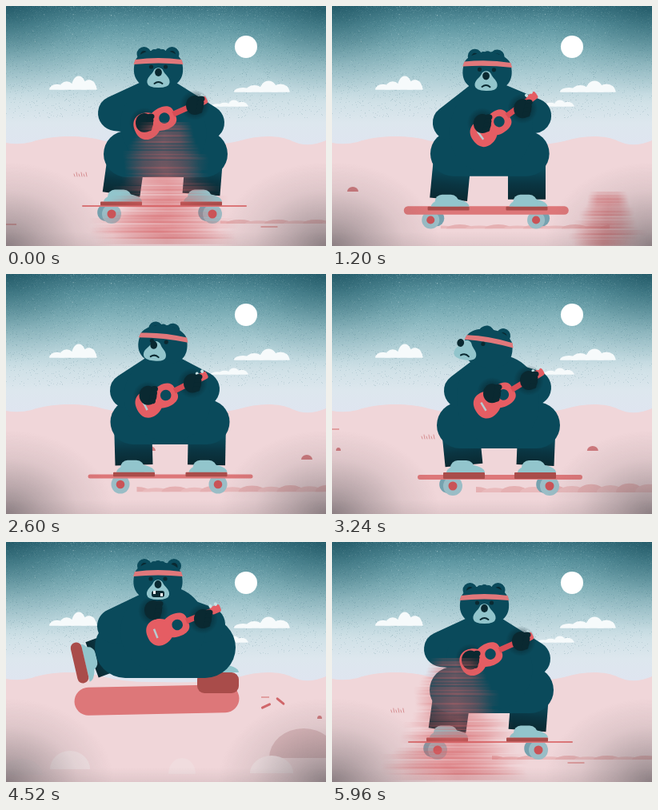
Animation, 400 px wide and 300 px high, one loop 6000 ms. Source, as an HTML page with a canvas:

```html
<!DOCTYPE html>
<html lang="en">
<head>
<meta charset="utf-8">
<title>Skating bear</title>
<style>
html, body { margin: 0; width: 100%; height: 100%; overflow: hidden; background: #f0d6d9; }
canvas { display: block; width: 400px; height: 300px; }
</style>
</head>
<body>
<canvas id="stage" width="400" height="300"></canvas>
<script>
const LOOP = 6000, STEP = 40, TAU = Math.PI * 2, DEG = Math.PI / 180;
const FUR = '#0a4a5b', DARK = '#0a2931', PALE = '#92c5cc', RED = '#e55d63',
      BAND = '#e0787b', BOARD = '#dd7779', SOLE = '#a94c4a';
let g = document.getElementById('stage').getContext('2d');

// head: x, y, tilt, turn, dip, mouth; arms: both elbows; knees: both, radius
// feet: x, y, angle, sole height (twice); board: x, y, thickness, tilt
// wheels: x1, x2, y, radius, far wheel offset
const front = {
  t: 0, head: [190.5, 79, 0, 0, 0, 0], ears: [-18, 17], arms: [137, 134, 251, 146],
  knees: [151, 185, 248, 185, 29], feet: [144, 247, 0, 5, 244, 247, 0, 5],
  guitar: [187, 145, -24], hands: [173, 146, 236, 124],
  board: [198, 250, 2, 0], wheels: [132, 258, 260, 12, -7]
};
const poses = [
  front,
  { t: 600, head: [192, 81, 1, -.32, 2, 0], ears: [-15, 17], arms: [152, 146, 262, 131],
    knees: [147, 187, 241, 187, 29], feet: [139, 256, 0, 6, 241, 256, 0, 6],
    guitar: [217, 148, -46], hands: [211, 138, 251, 120],
    board: [187, 258, 15, 0], wheels: [115, 253, 272, 11, 8] },
  { t: 1960, head: [197, 84, 2, .36, 0, 0], ears: [-17, 5], arms: [142, 146, 238, 146],
    knees: [157, 181, 247, 181, 27], feet: [155, 249, 0, 3, 247, 249, 0, 3],
    guitar: [174, 157, -23], hands: [155, 158, 220, 140],
    board: [201, 252, 4, 0], wheels: [135, 258, 261, 11, 6] },
  { t: 3240, head: [195, 93, 10, -1, -5, 0], ears: [-5, 16], arms: [162, 146, 252, 142],
    knees: [160, 189, 256, 189, 29], feet: [165, 252, 0, 8, 254, 252, 0, 8],
    guitar: [204, 157, -31], hands: [200, 148, 246, 133],
    board: [210, 254, 6, 0], wheels: [151, 272, 265, 12, -6] },
  { t: 4520, head: [190, 49, 0, 0, 0, 1], ears: [-17, 20], arms: [136, 105, 252, 103],
    knees: [149, 132, 249, 132, 38], feet: [92, 151, 77, 14, 265, 176, 0, 26],
    guitar: [203, 108, -22], hands: [184, 86, 246, 96],
    board: [188.5, 197.5, 35, -1.2], wheels: [124, 250, 204, 0, 0] },
  { t: 5360, head: [183, 95, -12, .85, 15, 0], ears: [-19, 20], arms: [140, 142, 253, 142],
    knees: [148, 181, 249, 181, 28], feet: [139, 246, 0, 6, 243, 246, 0, 6],
    guitar: [197, 165, -29], hands: [156, 172, 240, 147],
    board: [184, 250, 4, 0], wheels: [125, 247, 263, 11, -10] },
  { ...front, t: 5960 },
  { ...front, t: LOOP }
];

// Scenery slides right; each piece is pinned to a place at one moment.
const props = [
  [grass, 0, 94, 213, .28], [dash, 0, 6, 273, .6, 14], [dash, 0, 329, 276, .6, 21],
  [dash, 600, 80, 219, .3, 14], [mound, 1960, 34, 221, .228, 7, 6, '#cd797d'],
  [mound, 1960, 216, 232, .25, 7, 6, '#cd797d'], [grass, 3240, 121, 206, .25],
  [dash, 3240, 4, 194, .25, 10], [dash, 5360, 323, 194, .22, 9],
  [twig, 4520, 325, 205, .3, -25], [twig, 4520, 343, 199, .3, 40],
  [mound, 4520, 392, 221, .3, 3, 4, '#cd797d'],
  [mound, 4520, 372, 270, .5, 43, 37, '#dcb8bb'], [mound, 4520, 80, 284, .5, 25, 23, '#f3e2e4'],
  [mound, 4520, 220, 290, .5, 17, 20, '#f0dcde'], [mound, 4520, 332, 289, .5, 27, 22, '#f3e2e4'],
  [mound, 4520, 20, 291, .5, 26, 20, '#ecd6d9']
];
// time, x, top, bottom
const smears = [[0, 199, 148, 296], [600, 55, 240, 298], [600, 313, 243, 298], [600, 386, 187, 268],
                [1050, 180, 235, 298], [1560, 210, 245, 298]];
const dustKeys = [
  { t: 0, d: [268, 400, 272, 5, 0] }, { t: 600, d: [128, 310, 283, 5, 0] },
  { t: 1960, d: [147, 400, 272, 6, 0] }, { t: 3240, d: [180, 400, 273, 7, 5] },
  { t: 3800, d: [300, 400, 273, 7, 5] }, { t: 4100, d: [400, 400, 273, 0, 0] },
  { t: 5100, d: [150, 150, 272, 0, 0] }, { t: 5360, d: [150, 318, 272, 7, 0] },
  { t: 5960, d: [200, 400, 272, 5, 0] }, { t: LOOP, d: [268, 400, 272, 5, 0] }
];

function random(seed) {
  return () => (seed = (seed * 16807) % 2147483647) / 2147483647;
}
function blend(keys, t) {
  const i = Math.max(1, keys.findIndex(k => k.t > t)), a = keys[i - 1], b = keys[i];
  const u = (t - a.t) / (b.t - a.t), s = u * u * (3 - 2 * u), out = {};
  for (const k in a) if (k !== 't') out[k] = a[k].map((v, n) => v + (b[k][n] - v) * s);
  return out;
}
function oval(x, y, rx, ry, color, a = 0, b = TAU) {
  g.beginPath();
  g.ellipse(x, y, Math.max(0, rx), Math.max(0, ry), 0, a, b);
  g.fillStyle = color;
  g.fill();
}
function pill(x, y, w, h, r, color) {
  g.beginPath();
  g.roundRect(x, y, w, h, r);
  g.fillStyle = color;
  g.fill();
}
function line(x1, y1, x2, y2, w, color, cap = 'round') {
  g.beginPath();
  g.moveTo(x1, y1);
  g.lineTo(x2, y2);
  g.lineWidth = w;
  g.lineCap = cap;
  g.strokeStyle = color;
  g.stroke();
}
function path(d, color) {
  g.fillStyle = color;
  g.fill(new Path2D(d));
}
function placed(x, y, deg, draw) {
  g.save();
  g.translate(x, y);
  g.rotate(deg * DEG);
  draw();
  g.restore();
}
function ramp(gradient, ...stops) {
  stops.forEach((c, i) => gradient.addColorStop(i / (stops.length - 1), c));
  return gradient;
}

function mound(x, y, rx, ry, color) { oval(x, y, rx, ry, color, Math.PI, TAU); }
function dash(x, y, w) { line(x - w / 2, y, x + w / 2, y, 1.5, '#dc8c8e', 'butt'); }
function twig(x, y, deg) {
  placed(x, y, deg, () => line(-5, 0, 5, 0, 3, '#d0666a'));
}
function grass(x, y) {
  for (let i = 0; i < 6; i++) line(x - 8 + i * 3, y, x - 9 + i * 3, y - 3 - (i * 2) % 4, 1, '#d68f92');
}
function cloud(x, y, w, h) {
  const lumps = [[.15, .4], [.36, .6], [.62, 1], [.84, .72]];
  for (const [p, s] of lumps) mound(x + p * w, y, w * .165, h * s, '#f6fafb');
  line(x, y - .7, x + w, y - .7, 1.5, '#f6fafb');
}

function paintBackdrop() {
  const sky = g.createLinearGradient(0, 0, 0, 172);
  [[0, '#3b7482'], [.14, '#5e97a2'], [.32, '#86b5bd'], [.5, '#abccd3'], [.7, '#d0e1e7'], [.85, '#dde7ee'], [1, '#dfe5f0']]
    .forEach(s => sky.addColorStop(...s));
  g.fillStyle = sky;
  g.fillRect(0, 0, 400, 300);
  const rnd = random(71);
  for (let i = 0; i < 6000; i++) {
    const y = rnd() ** 1.4 * 140;
    g.fillStyle = rnd() < .5 ? 'rgba(30,90,104,.13)' : 'rgba(220,242,242,.13)';
    g.fillRect(rnd() * 400 | 0, y | 0, 1, 1);
  }
  for (let i = 0; i < 10; i++) oval(rnd() * 400, rnd() * 45, .6, .6, 'rgba(225,240,242,.6)');
  cloud(55, 104.5, 58, 17);
  cloud(286, 107.5, 68, 14);
  cloud(257, 125.5, 45, 8);
  path('M0 171 Q15 174 32 170 C56 161 96 161 120 168 Q150 176 190 175 Q255 177 290 169 C315 161 342 161 358 169 Q377 178 400 168 V300 H0Z', '#f0d6d9');
}
function corner(x, y, rx, ry, rgb, alpha) {
  g.save();
  g.translate(x, y);
  g.scale(rx, ry);
  g.fillStyle = ramp(g.createRadialGradient(0, 0, 0, 0, 0, 1),
    `rgba(${rgb},${alpha})`, `rgba(${rgb},${alpha * .55})`, `rgba(${rgb},${alpha * .18})`, `rgba(${rgb},0)`);
  g.fillRect(-1, -1, 2, 2);
  g.restore();
}
function paintVignette() {
  for (const x of [0, 400]) {
    corner(x, 0, 130, 110, '18,72,86', .55);
    corner(x, 300, 135, 105, '84,80,84', .62);
  }
  g.fillStyle = ramp(g.createLinearGradient(0, 282, 0, 300), 'rgba(110,95,100,0)', 'rgba(110,95,100,.12)');
  g.fillRect(0, 282, 400, 18);
}
function layer(paint) {
  const c = document.createElement('canvas'), main = g;
  c.width = 400;
  c.height = 300;
  g = c.getContext('2d');
  paint();
  g = main;
  return c;
}

function paintDust(t) {
  const [x1, x2, y, h, grow] = blend(dustKeys, t).d;
  if (x2 - x1 < 1) return;
  g.save();
  g.beginPath();
  g.rect(x1, 0, x2 - x1, y);
  g.clip();
  for (let x = x1 - 48 + (t * .6) % 48, i = 0; x < x2 + 30; x += 24, i++) {
    const size = h * (.75 + .25 * (i % 2)) + grow * Math.max(0, (x - x1) / (x2 - x1));
    mound(x, y, 17, size, i % 2 ? '#e5b0b2' : '#e9babc');
  }
  g.restore();
}
function paintBoard({ board: [x, y, h, tilt], wheels: [x1, x2, wy, r, far] }) {
  if (r > 1) for (const wx of [x1, x2]) {
    oval(wx + far, wy - 2, r * .9, r * .9, '#76a2af');
    oval(wx, wy, r, r, '#9abdc6');
    oval(wx, wy, r * .46, r * .46, '#c95357');
  }
  placed(x, y, tilt, () => pill(-103, -h / 2, 206, h, h / 2, BOARD));
}
function paintShoe(x, y, deg, h) {
  placed(x, y, deg, () => {
    oval(2, -h / 2, 24, 10, PALE, Math.PI, TAU);
    pill(-17, -h / 2 - 15, 30, 15, [9, 10, 0, 0], PALE);
    pill(-26, -h / 2, 52, h, Math.min(h / 2, h > 10 ? 9 : 1), SOLE);
  });
}
function paintLeg(kx, ky, [x, y, deg, h]) {
  const up = h / 2 + 9, ax = x + Math.sin(deg * DEG) * up, ay = y - Math.cos(deg * DEG) * up;
  const shade = ramp(g.createLinearGradient(kx, ky, ax, ay), FUR, FUR, '#0a3542', DARK);
  line(kx, ky, ax, ay, 47, shade, 'butt');
  paintShoe(x, y, deg, h);
}
function paintBody({ head: [hx, hy], arms: a, knees: k, feet }) {
  paintLeg(k[0], k[1], feet.slice(0, 4));
  paintLeg(k[2], k[3], feet.slice(4));
  line(...k.slice(0, 4), k[4] * 2, FUR);
  g.beginPath();
  g.moveTo(a[0], a[1]);
  g.lineTo(hx - 8, hy + 34);
  g.lineTo(hx + 8, hy + 34);
  g.lineTo(a[2], a[3]);
  g.closePath();
  g.lineJoin = 'round';
  g.lineWidth = 44;
  g.fill();
  g.stroke();
  line((a[0] + a[2]) / 2, (a[1] + a[3]) / 2 + 8, (k[0] + k[2]) / 2, k[1] - 26, 102, FUR);
}
function paintGuitar(x, y, deg) {
  placed(x, y, deg, () => {
    path('M-28 0 C-28 -19 -10 -20 0 -12 C8 -16 26 -16 26 -4 L26 4 C26 16 8 16 0 12 C-10 20 -28 19 -28 0Z', RED);
    line(24, 0, 60, 0, 7, '#d94d55', 'butt');
    pill(57, -5, 13, 10, 3, RED);
    for (const tx of [59, 66]) oval(tx, -6, 2, 2.3, '#c7e1e3');
    oval(12, 0, 6.8, 6.8, FUR);
    line(-17, -6, -17, 6, 2.5, '#b8cbd0', 'butt');
  });
}
function glow(x, y) {
  oval(x, y, 19, 19, ramp(g.createRadialGradient(x, y, 5, x, y, 19), 'rgba(8,34,42,.9)', 'rgba(8,34,42,.4)', 'rgba(8,34,42,0)'));
}
function paintHand(x, y) {
  oval(x, y, 11, 12, DARK);
  for (let i = 0; i < 4; i++) oval(x + 8 - i, y - 8 + i * 5, 4.5, 3.6, DARK);
}
function paintHead([x, y, tilt, turn, dip, mouth], ears) {
  placed(x, y, tilt, () => {
    const sx = turn * 27, nx = turn * 35;
    for (const ex of ears) {
      oval(ex, -19, 9, 9, FUR);
      oval(ex, -18, 4.5, 5, DARK);
    }
    for (let i = -1; i < 2; i++) oval(i * 5 + turn * 5, -21 - (i === 0), 4, 4, FUR);
    path('M-30 -6 C-29 -30 29 -30 30 -6 C33 10 26 24 0 24 C-26 24 -33 10 -30 -6Z', FUR);
    path('M-29 -12 Q0 -16 29 -12 L31 -6 Q0 -9 -31 -6Z', BAND);
    for (const ex of [-9, 9]) {
      const px = ex + turn * 16;
      if (Math.abs(px) < 25) oval(px, -3 + dip * .3, 2.6, 2.6, DARK);
    }
    g.save();
    g.translate(sx, dip * .75);
    path('M-6 2 C-4 -3 4 -3 6 2 C8 7 15 10 14 17 Q13 23 0 23 Q-13 23 -14 17 C-15 10 -8 7 -6 2Z', PALE);
    if (mouth > .4) {
      pill(-8, 12, 16, 8 * mouth, 3, DARK);
      pill(-6, 12, 3, 4, 0, '#fff');
      pill(3, 15, 3, 4, 0, '#fff');
    } else {
      g.beginPath();
      g.moveTo(-5, 18);
      g.quadraticCurveTo(0, 14, 5, 18);
      g.lineWidth = 2;
      g.strokeStyle = DARK;
      g.stroke();
    }
    g.restore();
    oval(nx, 4 + dip, 4.4, 5, DARK);
  });
}
function paintMoth(t) {
  const u = (t - 5360) / 260;
  if (Math.abs(u) > 1) return;
  const x = 228 + u * 30, y = 104 - u * u * 18, flap = 3.5 + Math.cos(u * 30);
  oval(x, y, 4, flap, '#f4f7f5');
  oval(x + 3, y - 3, 2, 3, '#f4f7f5');
  line(x, y - 11, x + 1, y - 9, 1, DARK);
  line(x + 3, y - 12, x + 1, y - 9, 1, DARK);
}
function paintSmear(x, top, bottom) {
  const rnd = random(top * 37), size = bottom - top;
  for (let y = top; y < bottom; y += 4) {
    const low = (y - top) / size, w = 18 + size * (.1 + low * (.2 + rnd() * .3));
    const cx = x + (rnd() - .6) * size * .2 * low;
    const bar = ramp(g.createLinearGradient(cx - w, 0, cx + w, 0),
      'rgba(212,92,96,0)', 'rgba(212,92,96,.2)', `rgba(214,100,104,${.24 + low * .16})`,
      'rgba(212,92,96,.2)', 'rgba(212,92,96,0)');
    pill(cx - w, y - 3, w * 2, 6 + rnd() * 5, 3, bar);
  }
}
function since(t, t0) {
  return ((t - t0 + LOOP * 1.5) % LOOP) - LOOP / 2;
}

const backdrop = layer(paintBackdrop), vignette = layer(paintVignette);

function draw(t) {
  const p = blend(poses, t), [lx, ly, rx, ry] = p.hands;
  const strum = Math.sin(t / 62) * 1.5;
  g.drawImage(backdrop, 0, 0);
  for (const [kind, t0, x, y, v, ...rest] of props) {
    const px = x + since(t, t0) * v;
    if (px > -60 && px < 460) kind(px, y, ...rest);
  }
  paintDust(t);
  paintBoard(p);
  paintBody(p);
  glow(lx, ly);
  glow(rx, ry);
  paintGuitar(...p.guitar);
  paintHand(lx, ly + strum);
  paintHand(rx, ry);
  paintHead(p.head, p.ears);
  paintMoth(t);
  for (const [t0, x, top, bottom] of smears) {
    const px = x + since(t, t0) * 1.1;
    if (px > -150 && px < 550) paintSmear(px, top, bottom);
  }
  g.drawImage(vignette, 0, 0);
  oval(300, 51, 14, 14, '#fff');
}
function frame() {
  draw(Math.floor(performance.now() % LOOP / STEP) * STEP);
  requestAnimationFrame(frame);
}
frame();
</script>
</body>
</html>
```
